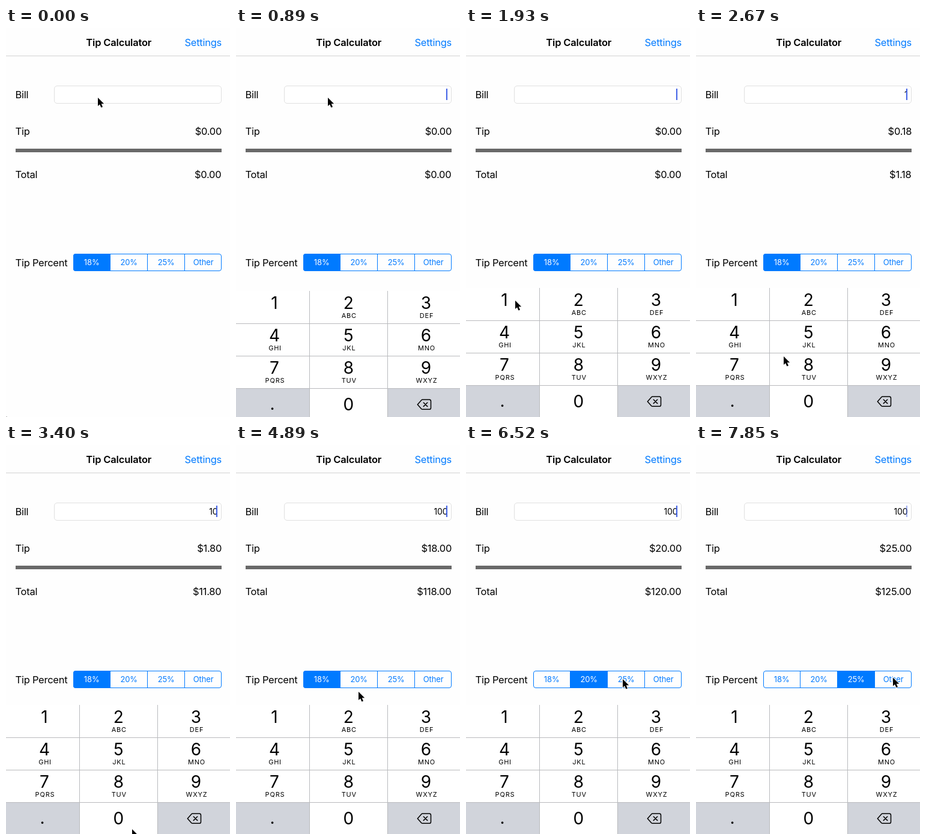
An HTML page for the animation above (7990 ms loop, 373x648 px).

```html
<!DOCTYPE html>
<html lang="en">
<head>
<meta charset="utf-8">
<title>Tip Calculator</title>
<style>
  html, body { margin: 0; width: 100%; height: 100%; overflow: hidden; background: #fefefe; }
  svg { display: block; width: 373px; height: 648px; }
  text { font: 16.5px Inter, Roboto, sans-serif; letter-spacing: -.25px; fill: #000; }
  .title { font-weight: 600; letter-spacing: -.18px; }
  .mid { text-anchor: middle; }
  .end { text-anchor: end; }
  .link { fill: #007aff; }
  .bill { font-size: 14px; letter-spacing: -.1px; }
  .seg text { font-size: 13px; letter-spacing: -.1px; fill: #007aff; text-anchor: middle; }
  .seg rect { fill: #007aff; fill-opacity: 0; }
  .seg .press rect { fill-opacity: .13; }
  .seg .on rect { fill-opacity: 1; }
  .seg .on text { fill: #fff; }
  .digit { font-size: 28px; letter-spacing: 0; text-anchor: middle; }
  .abc { font-size: 11px; letter-spacing: .8px; text-anchor: middle; }
</style>
</head>
<body>
<svg viewBox="0 0 373 648">
  <defs><clipPath id="pill"><rect x="112" y="376" width="247" height="29" rx="4"/></clipPath></defs>
  <rect width="373" height="648" fill="#fefefe"/>
  <rect y="46" width="373" height="1" fill="#d3d3d3"/>
  <text class="title mid" x="187.8" y="30">Tip Calculator</text>
  <text class="link end" x="359" y="30">Settings</text>

  <text x="15.5" y="117">Bill</text>
  <rect x="80.5" y="96.5" width="278" height="29" rx="4.5" fill="#fff" stroke="#e0e0e0"/>
  <text class="bill end" id="bill" x="352.5" y="115.5"></text>
  <rect id="caret" x="350" y="101" width="2" height="19" fill="#4263e6"/>

  <text x="15.5" y="178">Tip</text>
  <text class="end" id="tip" x="359.2" y="178"></text>
  <rect x="16" y="201" width="343" height="6" fill="#696969"/>
  <text x="15.5" y="250">Total</text>
  <text class="end" id="total" x="358.4" y="250"></text>

  <text x="15.5" y="396.5">Tip Percent</text>
  <g class="seg">
    <g id="segs" clip-path="url(#pill)"></g>
    <path d="M173.5 376v29M235.5 376v29M297.5 376v29" stroke="#007aff"/>
    <rect x="112.5" y="376.5" width="246" height="28" rx="3.5" stroke="#007aff"/>
  </g>

  <g id="pad">
    <rect y="433" width="373" height="220" fill="#fff"/>
    <path d="M0 596h122v57H0zM253 596h120v57H253z" fill="#d1d4db"/>
    <rect id="key1" y="433" width="122" height="54" fill="#d1d4db"/>
    <rect id="key0" x="123" y="596" width="129" height="57" fill="#d1d4db"/>
    <path d="M0 487.5h373M0 541.5h373M0 595.5h373M122.5 433v220M252.5 433v220" stroke="#b9babd" fill="none"/>
    <g id="keys"></g>
    <g fill="none" stroke="#000" stroke-width="1.5" stroke-linecap="round" stroke-linejoin="round">
      <path d="M302.3 622.2l6.4-7.2q.8-.9 2-.9h11.2q2.6 0 2.6 2.6v11q0 2.6-2.6 2.6h-11.2q-1.2 0-2-.9z"/>
      <path d="M312.3 619l6.4 6.4M318.7 619l-6.4 6.4"/>
    </g>
  </g>

  <rect id="corner" y="647" width="2" height="1" fill="#bbb"/>
  <path id="mouse" d="M0 0V14L3.1 11.2L5.4 16.6L8 15.5L5.7 10.3H10.2Z"
        stroke="#fff" stroke-width="1.8" paint-order="stroke"/>
</svg>
<script>
const LOOP = 7990, TICKS = 54, TICK = LOOP / TICKS;
const $ = id => document.getElementById(id);
const rates = [18, 20, 25];

$('segs').innerHTML = ['18%', '20%', '25%', 'Other'].map((label, i) =>
  `<g><rect x="${112 + 62 * i}" y="376" width="62" height="29"/>` +
  `<text x="${142.7 + 62 * i}" y="395.3">${label}</text></g>`).join('');
const segs = [...$('segs').children];

const cols = [64, 187.3, 316.5];
const groups = ['', 'ABC', 'DEF', 'GHI', 'JKL', 'MNO', 'PQRS', 'TUV', 'WXYZ'];
$('keys').innerHTML = groups.map((abc, i) => {
  const x = cols[i % 3], y = 463 + 54 * Math.floor(i / 3);
  return `<text class="digit" x="${x}" y="${y}">${i + 1}</text>` +
         `<text class="abc" x="${x + 1}" y="${y + 15}">${abc}</text>`;
}).join('') +
  '<text class="digit" x="187.3" y="632">0</text><text class="digit" x="60.5" y="631">.</text>';

// Pointer stops: tick, x, y
const stops = [
  [6, 153, 116], [13, 82, 454], [15, 82, 454], [21, 210, 640], [31, 210, 640],
  [33, 204, 411], [35, 208.5, 393.5], [40, 208.5, 393.5], [42, 261, 390],
  [49, 261, 390], [53, 328, 387.5]
];

function pointer(n) {
  if (n <= stops[0][0]) return stops[0].slice(1);
  const i = stops.findIndex(s => s[0] >= n);
  const [a, x0, y0] = stops[i - 1], [b, x1, y1] = stops[i];
  const u = (n - a) / (b - a), k = u * u * (3 - 2 * u);
  return [x0 + (x1 - x0) * k, y0 + (y1 - y0) * k];
}

// The caret stays lit after focus or a key, then blinks every six ticks
function caret(n) {
  const start = [31, 23, 15, 6].find(s => n >= s);
  if (start === undefined) return 0;
  const p = (n - start + 5) % 6;
  return n === start || p < 3 ? 1 : p === 3 ? .5 : 0;
}

const show = (id, on) => $(id).setAttribute('visibility', on ? 'visible' : 'hidden');
const money = v => '$' + v.toFixed(2);

function draw(n) {
  const bill = n >= 31 ? 100 : n >= 23 ? 10 : n >= 15 ? 1 : 0;
  const pick = n >= 47 ? 2 : n >= 37 ? 1 : 0;
  const press = n === 46 ? 2 : n === 36 ? 1 : -1;
  const tip = bill * rates[pick] / 100;

  $('bill').textContent = bill || '';
  $('tip').textContent = money(tip);
  $('total').textContent = money(bill + tip);
  segs.forEach((s, i) => s.setAttribute('class', i === pick ? 'on' : i === press ? 'press' : ''));

  show('pad', n >= 6);
  $('pad').setAttribute('transform', `translate(0 ${n === 6 ? 5 : 0})`);
  $('key1').setAttribute('opacity', n === 14 ? 1 : 0);
  $('key0').setAttribute('opacity', n === 22 || n === 30 ? 1 : 0);
  show('corner', n < 4);
  $('caret').setAttribute('opacity', caret(n));
  $('mouse').setAttribute('transform', `translate(${pointer(n)})`);
}

let last = -1;
const begin = performance.now();
function loop() {
  const t = (performance.now() - begin) % LOOP;
  const n = Math.min(TICKS - 1, Math.floor((t + 6) / TICK));
  if (n !== last) draw(last = n);
  requestAnimationFrame(loop);
}
loop();
</script>
</body>
</html>
```
